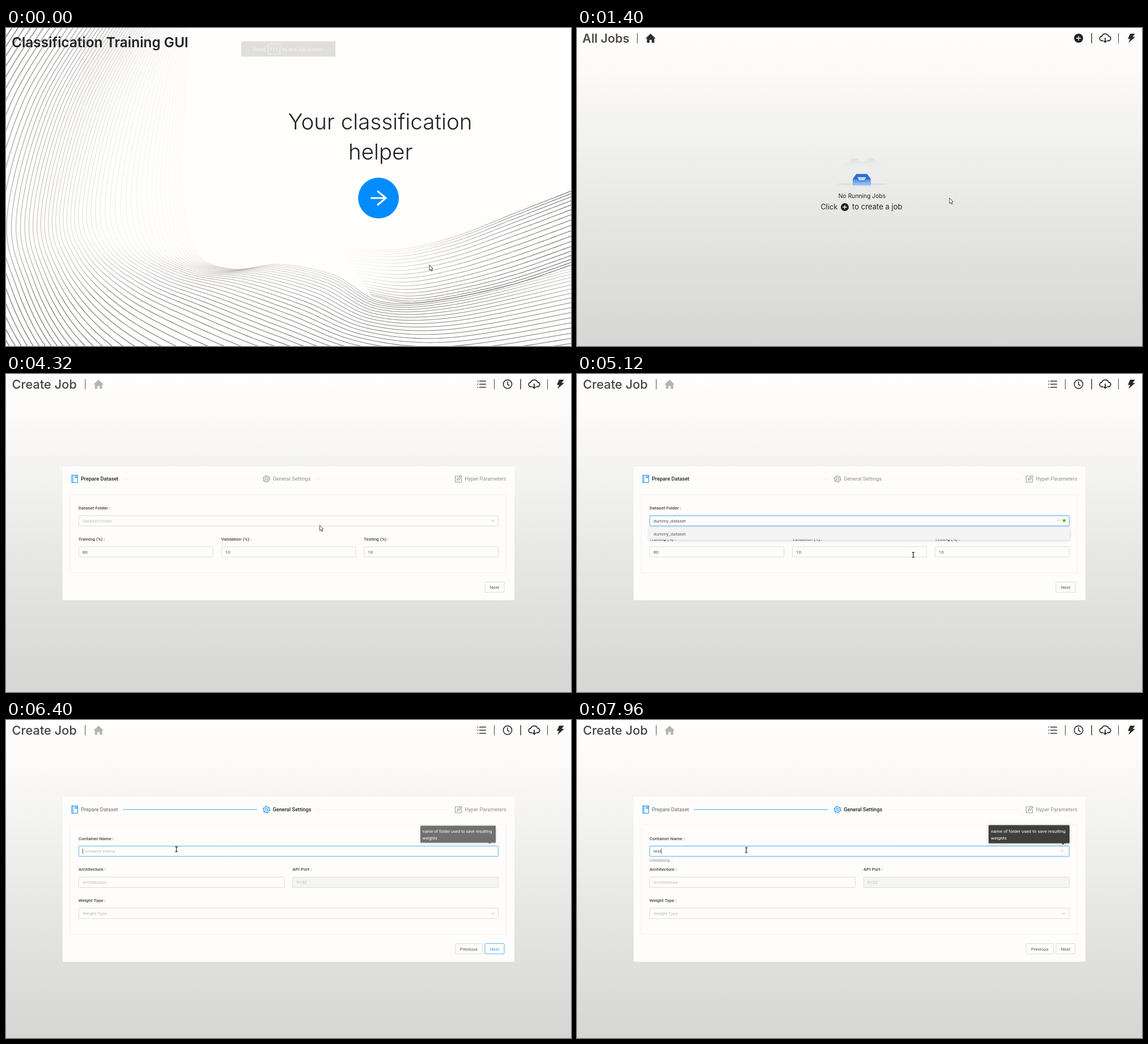
Write an HTML page with a canvas that moves like this. It is 998 by 561 pixels and loops after 8 s.

```html
<!DOCTYPE html>
<html lang="en">
<head>
<meta charset="utf-8">
<title>Classification Training GUI</title>
<style>
html, body { margin: 0; width: 100%; height: 100%; overflow: hidden; }
body { position: relative; background: linear-gradient(#fffefd 0, #fcfbfa 12%, #f1f1f0 36%, #e5e5e4 62%, #d6d6d5 100%); }
svg, canvas, .landing { position: absolute; left: 0; top: 0; width: 998px; height: 561px; }
.landing { background: #fffefd; }
text { font: 8px Roboto, sans-serif; fill: #555; white-space: pre; }
.round { font-family: Inter, sans-serif; fill: #222; }
.mid { text-anchor: middle; }
.title { font-size: 21.5px; font-weight: 600; fill: #4d4b4a; }
.thin { font-size: 21.8px; font-weight: 500; fill: #444; }
.brand { font-size: 24.4px; font-weight: 600; }
.hero { font-size: 38.6px; font-weight: 300; }
.label { font-weight: 500; fill: #444; }
.hint { fill: #bdbdbd; }
.step { font-size: 9.2px; fill: #8e8e8e; }
.step.done { fill: #666; }
.step.now { font-weight: 500; fill: #222; }
.box { fill: #fefdfc; stroke: #dcdcdc; }
.off { fill: #f4f4f3; }
.ring { fill: none; stroke: #74bff2; filter: drop-shadow(0 0 .8px #1890ff55); }
.line { fill: none; stroke: currentColor; stroke-width: 1.1; }
.bar { stroke: #444; }
.wait { color: #9b9b9b; }
.blue { color: #2196ec; }
.blue text { fill: #3a9fea; }

[class*="a-"] { animation: 8s linear infinite both; }
.a-notice { animation-name: notice; }
.a-landing { animation-name: landing; }
.a-empty { animation-name: empty; }
.a-jobs { animation-name: jobs; }
.a-create { animation-name: create; }
.a-first { animation-name: first; }
.a-second { animation-name: second; }
.a-pick { animation-name: pick; }
.a-drop { animation-name: drop; transform-origin: 0 269px; }
.a-unset { animation-name: unset-value; }
.a-set { animation-name: set-value; }
.a-check { animation-name: check; }
.a-hover { animation-name: hover; }
.a-grow { animation-name: grow; transform-origin: 206px 0; }
.a-stay { animation-name: stay; }
.a-focus { animation-name: focus; }
.a-tip { animation-name: tip; transform-origin: 798.5px 201.5px; }
.a-blank { animation-name: blank; }
.a-key { animation-name: key; }
.a-typed { animation-name: typed; }
.a-caret { animation-name: caret; }
.a-spin { animation: spin 1s linear infinite; }
.a-move { animation-name: move; animation-timing-function: ease-in-out; }
.a-arrow { animation-name: arrow; }
.a-beam { animation-name: beam; }

@keyframes notice { 0% { opacity: 1 } 3%, 100% { opacity: 0 } }
@keyframes landing { 0%, 13% { opacity: 1 } 14.5%, 100% { opacity: 0 } }
@keyframes empty { 0%, 13.5% { opacity: 0 } 16.5%, 100% { opacity: 1 } }
@keyframes jobs { 0%, 44.5% { opacity: 1 } 45.5%, 100% { opacity: 0 } }
@keyframes create { 0%, 44.5% { opacity: 0 } 46%, 100% { opacity: 1 } }
@keyframes first { 0%, 71.49% { opacity: 1 } 71.5%, 100% { opacity: 0 } }
@keyframes second { 0%, 71.49% { opacity: 0 } 71.5%, 100% { opacity: 1 } }
@keyframes pick { 0%, 56.5% { opacity: 0 } 58.5%, 67% { opacity: 1 } 70%, 100% { opacity: 0 } }
@keyframes drop {
  0%, 57% { opacity: 0; transform: scaleY(.8) }
  59%, 63.6% { opacity: 1; transform: none }
  64% { opacity: .93; transform: none }
  66%, 100% { opacity: 0; transform: scaleY(.8) }
}
@keyframes unset-value { 0%, 61.99% { opacity: 1 } 62%, 100% { opacity: 0 } }
@keyframes set-value { 0%, 61.99% { opacity: 0 } 62%, 100% { opacity: 1 } }
@keyframes check { 0%, 61.99% { opacity: 0 } 62%, 64.5% { opacity: 1 } 65.5%, 100% { opacity: 0 } }
@keyframes hover { 0%, 68% { opacity: 0 } 70%, 100% { opacity: 1 } }
@keyframes grow { 0%, 71.5% { transform: scaleX(0) } 75%, 100% { transform: none } }
@keyframes stay { 0%, 80% { opacity: 1 } 82.5%, 100% { opacity: 0 } }
@keyframes focus { 0%, 78.8% { opacity: 0 } 80.2%, 100% { opacity: 1 } }
@keyframes tip {
  0%, 79.2% { opacity: 0; transform: scale(.8) }
  80% { opacity: .74; transform: scale(.93) }
  81%, 100% { opacity: 1; transform: none }
}
@keyframes blank { 0%, 86.99% { opacity: 1 } 87%, 100% { opacity: 0 } }
@keyframes key { 0%, 86.99% { fill-opacity: 0 } 87%, 100% { fill-opacity: 1 } }
@keyframes typed { 0%, 87% { opacity: 0 } 88.5%, 100% { opacity: 1 } }
@keyframes caret {
  0%, 86.99% { transform: none }
  87%, 88.49% { transform: translateX(2.6px) }
  88.5%, 89.99% { transform: translateX(6.9px) }
  90%, 91.49% { transform: translateX(11px) }
  91.5%, 100% { transform: translateX(13.6px) }
}
@keyframes spin { to { transform: rotate(360deg) } }
@keyframes move {
  0%, 1% { transform: translate(748px, 418px) }
  8% { transform: translate(664px, 310px) }
  10%, 20.5% { transform: translate(658px, 300px) }
  29% { transform: translate(905px, 85px) }
  31.5% { transform: translate(911px, 66px) }
  35% { transform: translate(898px, 45px) }
  39% { transform: translate(887px, 35px) }
  42% { transform: translate(887px, 27px) }
  43%, 45.5% { transform: translate(887px, 20px) }
  53% { transform: translate(557px, 270px) }
  54% { transform: translate(554px, 267px) }
  56%, 57.5% { transform: translate(552px, 259px) }
  60% { transform: translate(560px, 282px) }
  63% { transform: translate(564px, 284px) }
  64% { transform: translate(594px, 319px) }
  69% { transform: translate(860px, 376px) }
  74.5% { transform: translate(862px, 377px) }
  78.5% { transform: translate(310px, 230px) }
  80% { transform: translate(301px, 228px) }
  100% { transform: translate(299px, 229.5px) }
}
@keyframes arrow { 0%, 63.4% { opacity: 1 } 63.41%, 64.8% { opacity: 0 } 64.81%, 78.4% { opacity: 1 } 78.41%, 100% { opacity: 0 } }
@keyframes beam { 0%, 63.4% { opacity: 0 } 63.41%, 64.8% { opacity: 1 } 64.81%, 78.4% { opacity: 0 } 78.41%, 100% { opacity: 1 } }
</style>
</head>
<body>
<svg id="app" viewBox="0 0 998 561"></svg>

<div class="landing a-landing">
  <canvas id="waves" width="998" height="561"></canvas>
  <svg viewBox="0 0 998 561">
    <text class="round brand" x="10" y="33.5">Classification Training GUI</text>
    <text class="round hero mid" x="661" y="178.5">Your classification</text>
    <text class="round hero mid" x="661.5" y="232">helper</text>
    <circle cx="658" cy="300" r="36" fill="#008cff"/>
    <path d="M644 300H671M656 287.5L671 300 656 312.5" fill="none" stroke="#fff" stroke-width="3"/>
    <g class="a-notice">
      <rect x="415.5" y="23.5" width="166.5" height="27" rx="1" fill="#e0dfde"/>
      <rect x="463" y="28" width="21" height="18" rx="1.5" fill="none" stroke="#f6f6f5"/>
      <g id="notice"></g>
    </g>
  </svg>
</div>

<svg viewBox="0 0 998 561">
  <g class="a-move">
    <path class="a-arrow" d="M0 0V9.5L2.2 7.6 3.6 10.8 5.2 10.1 3.8 7 6.3 6.6Z" fill="#fff" stroke="#333" stroke-width=".9"/>
    <path class="a-beam" d="M-2.2-4.5Q0-4.5 0-3 0-4.5 2.2-4.5M0-3.5V3.5M-2.2 4.5Q0 4.5 0 3 0 4.5 2.2 4.5" fill="none" stroke="#333" stroke-width="1.3"/>
  </g>
</svg>

<script>
const text = (x, y, s, cls = '', style = '') => `<text x="${x}" y="${y}" class="${cls}" style="${style}">${s}</text>`;
const at = (x, y, inner, cls = '') => `<g transform="translate(${x} ${y})" class="${cls}">${inner}</g>`;
const bar = (x, w = 1) => `<path class="bar" d="M${x} 9V27" stroke-width="${w}"/>`;
const box = (x, y, w, cls = 'box') => `<rect class="${cls}" x="${x + .5}" y="${y}" width="${w - 1}" height="18.2" rx="1"/>`;

const plus = r => `<circle r="${r}" fill="#222"/><path d="M${-r / 2} 0H${r / 2}M0 ${-r / 2}V${r / 2}" stroke="#fff" stroke-width="1.3"/>`;
const home = color => `<path d="M-9 .5L0-8 9 .5H6.5V8H2V3H-2V8H-6.5V.5Z" fill="${color}"/>`;
const cloud = `<g fill="none" stroke="#2b2b2b" stroke-width="1.8"><path d="M-3.5 4.5H-5.5A4 4 0 0 1-6-3.5 6.3 6 0 0 1 6-3.5 4 4 0 0 1 5.5 4.5H3.5"/><path d="M0-1V7M-2.6 4.6L0 7.2 2.6 4.6"/></g>`;
const bolt = `<path d="M-2-8H6.5L2.5-2.2H7L-5 8.2-2 1.2H-6Z" fill="#2b2b2b"/>`;
const clock = `<g fill="none" stroke="#333" stroke-width="1.6"><circle r="7.6"/><path d="M0-4.8V.5L3.2 2.5"/></g>`;
const list = `<path d="M-4-5.5H8M-4 0H8M-4 5.5H8M-7.5-5.5H-5.8M-7.5 0H-5.8M-7.5 5.5H-5.8" stroke="#333" stroke-width="1.6"/>`;
const book = `<path class="line" d="M-5-6.5H5.5V6.5H-5ZM-2.8-6.5V6.5M1-6.5V-2L2.5-3 4-2V-6.5"/>`;
const gear = `<circle class="line" r="5"/><circle class="line" r="2.2"/><circle class="line" r="5.9" stroke-dasharray="3 3.18"/>`;
const edit = `<path class="line" d="M2-5H-5.5V5.8H5.5V-1M-2 2.5L-1.5 0 4.5-6 6.5-4 .5 2Z"/>`;
const chevron = (x, y) => `<path d="M${x - 2.7} ${y - 1.4}L${x} ${y + 1.6} ${x + 2.7} ${y - 1.4}" fill="none" stroke="#b5b5b5"/>`;
const spinner = (x, y) => at(x, y, '<path class="a-spin" d="M-2.3 1A2.5 2.5 0 0 1 .5-2.4" fill="none" stroke="#999" stroke-width=".8"/>');

const field = (x, y, w, label, value, cls = 'hint', shape = 'box') =>
  text(x, y - 10.8, label + ' :', 'label') + box(x, y, w, shape) + text(x + 7, y + 12, value, cls);
const button = (x, w, y, s) =>
  `<rect class="box" x="${x + .5}" y="${y}" width="${w - 1}" height="18" rx="1"/>` + text(x + w / 2, y + 12, s, 'mid');
const blueButton = (x, w, y, s, cls) =>
  `<g class="blue ${cls}"><rect x="${x + .5}" y="${y}" width="${w - 1}" height="18" rx="1" fill="#fefdfc" stroke="#62b4ee"/>${text(x + w / 2, y + 12, s, 'mid')}</g>`;

function steps(y, current) {
  const icons = [book, gear, edit], names = ['Prepare Dataset', 'General Settings', 'Hyper Parameters'];
  return names.map((name, i) => {
    const state = i < current ? 'done' : i === current ? 'now' : '';
    const x = 121 + 339 * i;
    return at(x, y, icons[i], i <= current ? 'blue' : 'wait') + text(x + 11.2, y + 3.2, name, 'step ' + state);
  }).join('') + `<path d="M209 ${y}H443M547 ${y}H782" stroke="#f0f0ef"/>`;
}
const card = (y, h, inner, innerH) =>
  `<rect x="100" y="${y}" width="798" height="${h}" fill="#fefdfc"/>` +
  `<rect x="113.5" y="${inner}" width="770" height="${innerH}" rx="1" fill="none" stroke="#f3f2f1"/>`;

const tools = bar(909, 1.6) + at(933, 18, cloud) + bar(956.5) + at(979, 18, bolt);

const inbox = `
  <defs>
    <linearGradient id="haze" x2="0" y2="1"><stop stop-color="#dededd"/><stop offset="1" stop-color="#e9e9e8" stop-opacity="0"/></linearGradient>
    <linearGradient id="front" x2="0" y2="1"><stop stop-color="#4b8fe6"/><stop offset="1" stop-color="#a9cbf3"/></linearGradient>
  </defs>
  <path d="M468 247Q472 237 480 236 483 229 490 230 496 229 499 235H511Q514 229 520 229 527 230 529 237 535 239 537 247Z" fill="url(#haze)"/>
  <ellipse cx="503.5" cy="275.5" rx="46" ry="2" fill="#dededd"/>
  <path d="M493.5 257.5H512.5L519 266.5V278H487V266.5Z" fill="#2d6fd0"/>
  <path d="M495.5 263H510.5L508 269H498Z" fill="#bcd7f7"/>
  <path d="M487 267H495L498 270.5H508L511 267H519V278H487Z" fill="url(#front)"/>`;

const jobs = text(9.5, 25.5, 'All Jobs', 'round title') + bar(106.5) + at(130, 18, home('#2f2f2f')) +
  at(886, 18, plus(8)) + tools +
  `<g class="a-empty">${inbox}${text(503.5, 300, 'No Running Jobs', 'round mid', 'font-size:10.3px')}
  ${text(430.5, 320, 'Click', 'round', 'font-size:12.8px')}${at(473, 316, plus(7))}
  ${text(486, 320, 'to create a job', 'round', 'font-size:13.1px')}</g>`;

const datasetForm = card(163, 236, 212.5, 138) + steps(185, 0) +
  field(128, 249.9, 742, 'Dataset Folder', '') +
  text(135, 261.9, 'Dataset Folder', 'hint a-unset') +
  `<g class="a-unset">${chevron(860, 259)}</g>` +
  field(128, 304.7, 238, 'Training (%)', '80', '') +
  field(380, 304.7, 238, 'Validation (%)', '10', '') +
  field(632, 304.7, 238, 'Testing (%)', '10', '') +
  `<g class="a-pick">${box(128, 249.9, 742, 'ring')}</g>` +
  text(135, 261.9, 'dummy_dataset', 'a-set') +
  `<circle class="a-set" cx="860.5" cy="258.5" r="2.6" fill="#52c41a"/>` +
  `<g class="a-check">${spinner(851, 260)}</g>` +
  `<g class="a-drop"><rect x="128" y="271" width="742" height="21.5" fill="#f4f4f3" style="filter:drop-shadow(0 1px 3px #0003)"/>${text(135, 284.8, 'dummy_dataset')}</g>` +
  button(845.5, 35, 367, 'Next') + blueButton(845.5, 35, 367, 'Next', 'a-hover');

const tooltip = `<g class="a-tip">
  <path d="M728 185.5H869Q870 185.5 870 186.5V216.5Q870 217.5 869 217.5H861L858.5 220 856 217.5H728Q727 217.5 727 216.5V186.5Q727 185.5 728 185.5Z" fill="#3f3f3d" style="filter:drop-shadow(0 1px 3px #0003)"/>
  ${text(731.2, 199, 'name of folder used to save resulting', '', 'fill:#fff')}${text(731.2, 211.2, 'weights', '', 'fill:#fff')}</g>`;

const typed = [...'test'].map((c, i) => `<tspan class="a-key" style="animation-delay:${i * 120}ms">${c}</tspan>`).join('');

const settingsForm = card(135, 291.5, 185, 193) + steps(158, 1) +
  '<path class="a-grow" d="M206.5 158H443.5" stroke="#48a8ec" stroke-width="1.2"/>' +
  field(128, 222.4, 742, 'Container Name', '') +
  text(135, 234.4, 'Container Name', 'hint a-blank') +
  field(128, 277.2, 364, 'Architecture', 'Architecture') +
  field(506, 277.2, 364, 'API Port', '9132', 'hint', 'box off') +
  field(128, 332, 742, 'Weight Type', 'Weight Type') + chevron(860, 341.2) +
  `<g class="a-focus">${box(128, 222.4, 742, 'ring')}<path class="a-caret" d="M135.5 226.5V236.5" stroke="#444" stroke-width=".8"/></g>` +
  text(135, 234.4, typed) +
  `<g class="a-typed">${text(128, 250, 'Validating...', '', 'fill:#909090')}${spinner(859, 231.5)}</g>` +
  button(793, 49, 394.5, 'Previous') + button(845.5, 35, 394.5, 'Next') +
  blueButton(845.5, 35, 394.5, 'Next', 'a-stay') + tooltip;

const create = text(10.5, 25.5, 'Create Job', 'round title thin') + bar(140) + at(163.5, 18, home('#b4b4b3')) +
  at(840, 18, list) + bar(862.5) + at(886, 18, clock) + tools +
  `<g class="a-first">${datasetForm}</g><g class="a-second">${settingsForm}</g>`;

document.getElementById('app').innerHTML = `<g class="a-jobs">${jobs}</g><g class="a-create">${create}</g>`;

const small = "font:9px 'Open Sans',sans-serif;fill:#fbfbfa";
document.getElementById('notice').innerHTML =
  text(436, 40.5, 'Press', '', small) + text(473.5, 40.5, 'F11', 'mid', small) + text(488, 40.5, 'to exit full screen', '', small);

// Catmull-Rom through a list of equally long vectors, u in 0..1
function spline(points, u) {
  const last = points.length - 1, pos = u * last, i = Math.min(Math.floor(pos), last - 1), f = pos - i;
  const p = k => points[Math.max(0, Math.min(last, i + k))];
  return p(0).map((b, d) => {
    const a = p(-1)[d], c = p(1)[d], e = p(2)[d];
    return b + f / 2 * (c - a + f * (2 * a - 5 * b + 4 * c - e + f * (3 * (b - c) + e - a)));
  });
}
const pairs = flat => flat.flatMap((v, i) => i % 2 ? [] : [[v, flat[i + 1]]]);

const outerToInner = [
  [-30, -40, -130, 130, -200, 340, -150, 480, -60, 620, 80, 760, 280, 870, 520, 930, 760, 940, 1010, 910],
  [165, -40, 60, 130, 5, 330, 28, 450, 90, 570, 200, 670, 360, 740, 560, 775, 770, 775, 1010, 745],
  [275, -40, 190, 130, 148, 310, 170, 392, 245, 450, 350, 495, 475, 545, 610, 590, 780, 610, 1010, 583],
  [328, -40, 316, 130, 310, 280, 335, 395, 400, 425, 485, 417, 580, 436, 665, 483, 790, 476, 1010, 422]
];
const upperToLower = [
  [590, 388, 690, 391, 790, 369, 900, 326, 1010, 283],
  [645, 472, 715, 485, 800, 474, 900, 451, 1010, 414]
];
const ctx = document.getElementById('waves').getContext('2d');
const ink = alpha => `rgba(70,70,70,${alpha})`;

function strokeCurve(keys, t, gradient, stops) {
  const knots = pairs(spline(keys, t));
  stops.forEach(([pos, alpha]) => gradient.addColorStop(pos, ink(alpha)));
  ctx.strokeStyle = gradient;
  ctx.beginPath();
  for (let s = 0; s <= 120; s++) ctx.lineTo(...spline(knots, s / 120));
  ctx.stroke();
}
for (let i = 0; i < 62; i++) {
  const t = i / 61, faint = .9 * (1 - t) ** 1.7 + .03;
  ctx.lineWidth = 1.5 - .6 * t;
  strokeCurve(outerToInner, t, ctx.createLinearGradient(0, 0, 0, 561),
    [[0, faint], [.68, faint * .8], [.76, .35 - .1 * t + faint / 3], [.86, .68], [1, .72]]);
}
for (let i = 0; i < 18; i++) {
  const t = i / 17;
  ctx.lineWidth = 1.2;
  strokeCurve(upperToLower, t, ctx.createLinearGradient(590, 0, 998, 0),
    [[0, 0], [.16, .05 + .35 * t ** 3], [.35, .12 + .4 * t], [.65, .42 + .2 * t], [1, .75]]);
}
</script>
</body>
</html>
```
